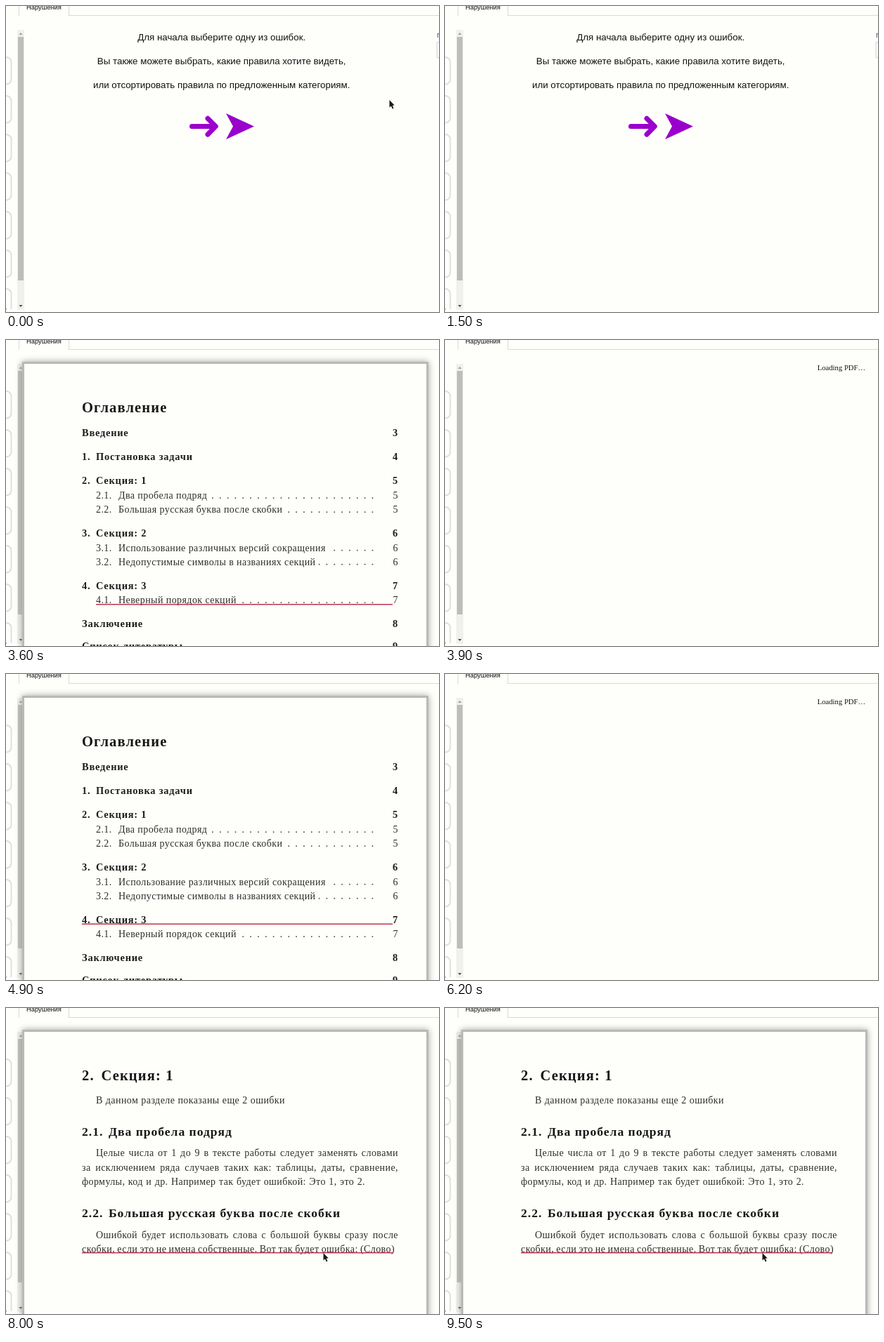
Write an HTML page with a canvas that moves like this. It is 616 by 436 pixels and loops after 9800 ms.

```html
<!DOCTYPE html>
<html lang="ru">
<head>
<meta charset="utf-8">
<title>Нарушения</title>
<style>
html, body { margin: 0; width: 100%; height: 100%; overflow: hidden; background: #fefffa; }
canvas { display: block; width: 616px; height: 436px; }
</style>
</head>
<body>
<canvas id="stage" width="616" height="436"></canvas>
<script>
const ctx = document.getElementById('stage').getContext('2d');
const LOOP = 9800, STEP = 100;
const PAPER = '#fefffa', PURPLE = '#9a00cc', RED = '#bd3550';
const SANS = '"Liberation Sans", Arial, sans-serif';
const SERIF = '"Liberation Serif", "Times New Roman", serif';

// Type styles of the document: weight, size, tracking in em, colour
const STYLE = {
  title: ['bold', 20.5, .055, '#161616'],
  head: ['bold', 17.6, .055, '#161616'],
  bold: ['bold', 14.4, .055, '#1c1c1c'],
  body: ['normal', 14, .03, '#2c2c2c']
};

function rect(x, y, w, h, color) {
  ctx.fillStyle = color;
  ctx.fillRect(x, y, w, h);
}

function shape(points, color) {
  ctx.beginPath();
  points.forEach(([x, y]) => ctx.lineTo(x, y));
  ctx.closePath();
  ctx.fillStyle = color;
  ctx.fill();
}

function label(str, x, y, size, family, color = '#111', align = 'left') {
  ctx.font = `${size}px ${family}`;
  ctx.fillStyle = color;
  ctx.textAlign = align;
  ctx.fillText(str, x, y);
}

function setStyle(name) {
  const [weight, size, track, color] = STYLE[name];
  ctx.font = `${weight} ${size}px ${SERIF}`;
  ctx.letterSpacing = `${size * track}px`;
  ctx.fillStyle = color;
  ctx.textAlign = 'left';
}

function write(name, str, x, y) {
  ctx.save();
  setStyle(name);
  ctx.fillText(str, x, y);
  ctx.restore();
}

function writeRight(name, str, x, y) {
  ctx.save();
  setStyle(name);
  ctx.fillText(str, x - ctx.measureText(str).width, y);
  ctx.restore();
}

// Paragraph line set flush to both margins
function justify(str, x, right, y) {
  ctx.save();
  setStyle('body');
  const words = str.split(' ');
  const widths = words.map(w => ctx.measureText(w).width);
  const gap = (right - x - widths.reduce((a, b) => a + b, 0)) / (words.length - 1);
  words.forEach((w, i) => {
    ctx.fillText(w, x, y);
    x += widths[i] + gap;
  });
  ctx.restore();
}

function underline(x, right, y) {
  rect(x, y, right - x, 1.5, RED);
}

function drawFrame() {
  rect(0, 0, 616, 436, PAPER);
  label('Нарушения', 29, 5, 9.333, SANS);
  const line = '#d9dad7';
  rect(18, 0, 1, 14, line);
  rect(89, 0, 1, 14, line);
  rect(89, 13, 527, 1, line);

  ctx.save();
  ctx.beginPath();
  ctx.rect(0, 0, 16, 432);
  ctx.clip();
  ctx.strokeStyle = '#dfdfdc';
  ctx.lineWidth = 2;
  for (let y = 73; y < 432; y += 55) {
    ctx.beginPath();
    ctx.roundRect(-40, y, 47.5, 38.5, 7);
    ctx.stroke();
  }
  ctx.restore();
  rect(0, 431, 1, 2, '#8fb0c8');

  rect(16, 34, 10, 399, '#f0f0ec');
  rect(17, 44, 8, 347, '#bdbeb9');
  shape([[18.5, 41], [23.5, 41], [21, 38]], '#9b9b98');
  shape([[18.5, 426], [23.5, 426], [21, 429]], '#4a4a48');
}

function drawIntro() {
  const lines = [
    'Для начала выберите одну из ошибок.',
    'Вы также можете выбрать, какие правила хотите видеть,',
    'или отсортировать правила по предложенным категориям.'
  ];
  lines.forEach((s, i) => label(s, 306.7, 49 + 34 * i, 13.333, SANS, '#111', 'center'));

  ctx.strokeStyle = PURPLE;
  ctx.lineWidth = 7;
  ctx.lineCap = ctx.lineJoin = 'round';
  ctx.beginPath();
  ctx.moveTo(264.5, 171.5);
  ctx.lineTo(298, 171.5);
  ctx.moveTo(287, 160.2);
  ctx.lineTo(298.3, 171.5);
  ctx.lineTo(287, 183);
  ctx.stroke();
  shape([[313, 153], [353, 171.5], [313, 190], [323, 171.5]], PURPLE);

  label('П', 613, 45, 9.333, SANS, '#24406a');
  ctx.strokeStyle = '#d0d1ce';
  ctx.lineWidth = 1;
  ctx.strokeRect(613.5, 51.5, 20, 22);
}

function drawLoading() {
  label('Loading PDF…', 529.7, 43, 10.667, SERIF);
}

function drawPaper() {
  ctx.save();
  ctx.shadowColor = 'rgb(160,161,156)';
  ctx.shadowBlur = 9;
  rect(23, 31, 578, 440, 'rgb(160,161,156)');
  ctx.restore();
  // soften the band just outside the sheet
  rect(23, 31, 578, 405, '#b9bab5');
  rect(26, 34, 572, 402, PAPER);
}

function tocPart(num, str, page, y) {
  if (num) write('bold', num, 108, y);
  write('bold', str, num ? 128 : 108, y);
  writeRight('bold', page, 558, y);
}

function tocItem(num, str, page, y, dots) {
  write('body', num, 128, y);
  write('body', str, 160, y);
  writeRight('body', page, 558, y);
  for (let i = 0; i < dots; i++) rect(520.6 - i * 10.83, y - 1.6, 1.6, 1.6, '#444');
}

function drawContents() {
  write('title', 'Оглавление', 108, 103);
  tocPart('', 'Введение', '3', 137);
  tocPart('1.', 'Постановка задачи', '4', 171);
  tocPart('2.', 'Секция: 1', '5', 205);
  tocItem('2.1.', 'Два пробела подряд', '5', 226, 22);
  tocItem('2.2.', 'Большая русская буква после скобки', '5', 246, 12);
  tocPart('3.', 'Секция: 2', '6', 280);
  tocItem('3.1.', 'Использование различных версий сокращения', '6', 300.5, 6);
  tocItem('3.2.', 'Недопустимые символы в названиях секций', '6', 320.5, 8);
  tocPart('4.', 'Секция: 3', '7', 354.5);
  tocItem('4.1.', 'Неверный порядок секций', '7', 375, 18);
  tocPart('', 'Заключение', '8', 409);
  tocPart('', 'Список литературы', '9', 441);
}

function drawSection() {
  write('title', '2.', 108, 103);
  write('title', 'Секция: 1', 135.5, 103);
  justify('В данном разделе показаны еще 2 ошибки', 128, 397, 136);
  write('head', '2.1.', 108, 182);
  write('head', 'Два пробела подряд', 146, 182);
  justify('Целые числа от 1 до 9 в тексте работы следует заменять словами', 128, 558, 211);
  justify('за исключением ряда случаев таких как: таблицы, даты, сравнение,', 108, 558, 231.5);
  justify('формулы, код и др. Например так будет ошибкой: Это 1, это 2.', 108, 511, 252);
  write('head', '2.2.', 108, 298);
  write('head', 'Большая русская буква после скобки', 146, 298);
  justify('Ошибкой будет использовать слова с большой буквы сразу после', 128, 558, 327.5);
  justify('скобки, если это не имена собственные. Вот так будет ошибка: (Слово)', 108, 553, 347.5);
  underline(108, 551, 348);
}

function drawCursor(x, y) {
  const tip = [[0, 0], [0, 10.5], [2.4, 8.4], [4.2, 12.6], [6, 11.8], [4.2, 7.8], [7.2, 7.6]];
  const points = tip.map(([dx, dy]) => [x + .5 + dx, y + dy]);
  shape(points, '#1a1a1a');
}

function cursorAt(t) {
  if (t < 1500) {
    const u = Math.max(0, (t - 1100) / 400);
    return [545 + 77 * u, 134 - 14 * u];
  }
  if (t < 6700) return null;
  const u = Math.min(1, (t - 6700) / 900), v = 1 - u;
  const bend = (a, b, c) => a * v * v + 2 * b * u * v + c * u * u;
  return [bend(611, 500, 451), bend(330, 412, 349)];
}

// Scene start times
const SCENES = [
  [0, drawIntro],
  [2200, drawLoading],
  [2300, drawPaper],
  [2400, () => { drawPaper(); drawContents(); underline(128, 550, 376); }],
  [3900, drawLoading],
  [4100, () => { drawPaper(); drawContents(); underline(108, 550, 355.5); }],
  [6200, drawLoading],
  [6400, drawPaper],
  [6500, () => { drawPaper(); drawSection(); }]
];

function draw(t) {
  drawFrame();
  SCENES.filter(([start]) => t >= start).pop()[1]();
  const pos = cursorAt(t);
  if (pos) drawCursor(...pos);
}

const begin = performance.now();
function tick() {
  const t = (performance.now() - begin) % LOOP;
  draw(Math.floor(t / STEP) * STEP);
  requestAnimationFrame(tick);
}
tick();
</script>
</body>
</html>
```
